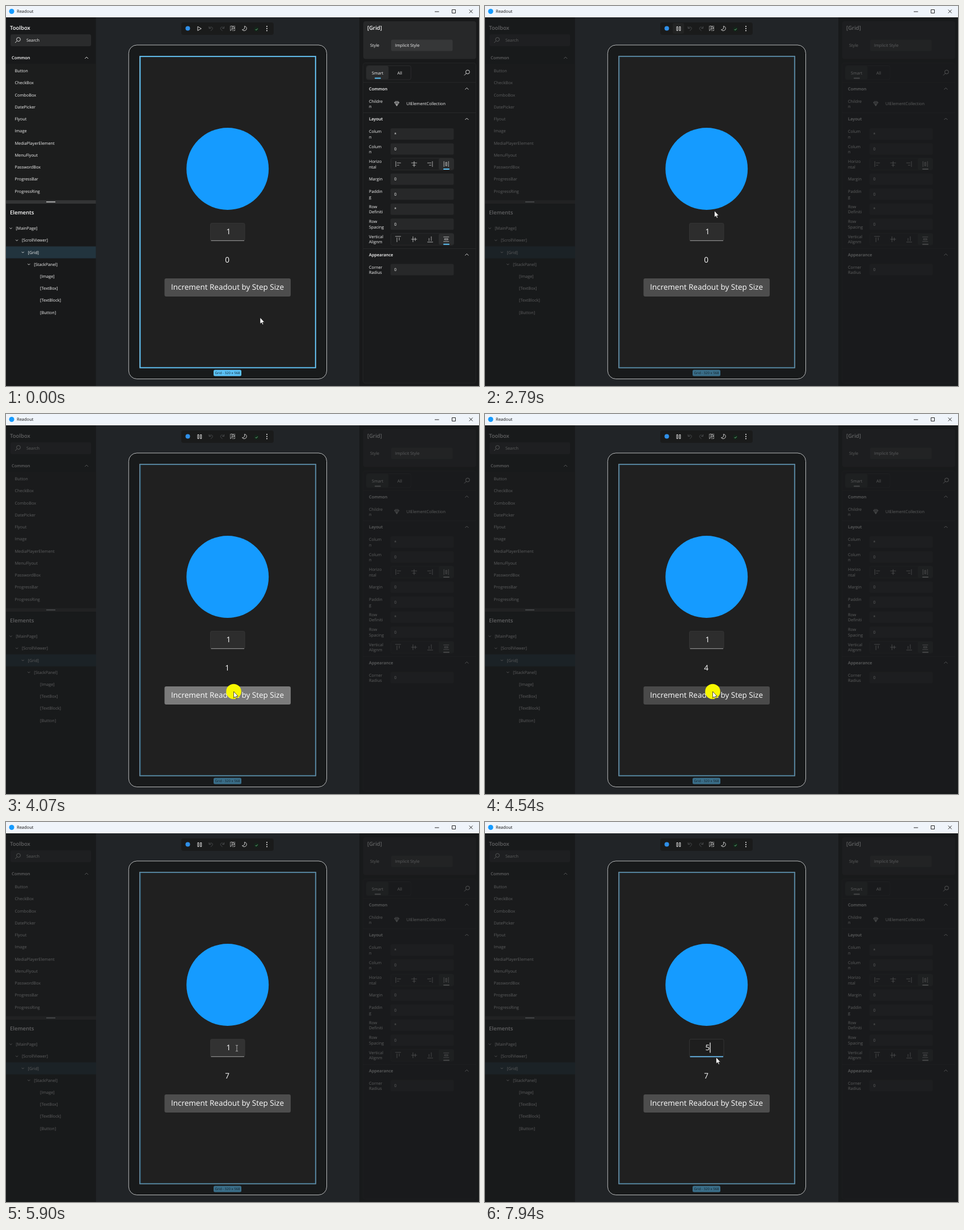
Recreate the animation shown at these times as an HTML page. Size 834 px wide and 671 px high, loop 8000 ms.

```html
<!DOCTYPE html>
<html lang="en">
<head>
<meta charset="utf-8">
<title>Readout</title>
<style>
html, body { margin: 0; width: 100%; height: 100%; overflow: hidden; background: #212427; }
svg { display: block; width: 834px; height: 671px; --accent: #5cc2f7; }
text { font: 7.3px "Open Sans", "Noto Sans", sans-serif; fill: #f4f4f4; text-rendering: geometricPrecision; white-space: pre; }
.b { font-weight: 600; font-size: 7.4px; fill: #fff; }
.h { font-weight: 600; font-size: 9.5px; fill: #fff; }
.app { font-size: 13.5px; fill: #fff; text-anchor: middle; }
.ico { fill: none; stroke: #e8e8e8; stroke-width: .9; }
.soft { fill: none; stroke: #d0d0d0; stroke-width: .8; }
.off { stroke: #4c4f51; }
.dark { stroke: #111; }
.accent { fill: var(--accent); }
</style>
</head>
<body>
<svg id="stage" viewBox="0 0 834 671">
  <rect width="834" height="671" fill="#212427"/>

  <!-- device -->
  <rect x="216.3" y="68.9" width="349.2" height="589.6" rx="14.5" fill="#181a1b" stroke="#b9bbbc"/>
  <rect x="235.5" y="88.5" width="311" height="550.5" fill="#202020" stroke="#777c80"/>
  <g id="frame">
    <rect x="236.5" y="89.2" width="309.2" height="549.4" fill="none" stroke="#5cc2f7" stroke-width="1.8"/>
    <rect x="366" y="642.5" width="49" height="11" rx="2.5" fill="#5cc2f7"/>
    <text x="390.5" y="650.3" style="font-size:6px;fill:#10202a;text-anchor:middle">Grid - 320 x 568</text>
  </g>
  <circle cx="390.7" cy="287.5" r="72.5" fill="#159bff"/>
  <rect id="box" y="383.5" height="31" rx="2.5"/>
  <path id="line"/>
  <text id="step" class="app" y="403.2"></text>
  <path id="caret" d="M397 389.5v18" stroke="#fff" stroke-width="1.2"/>
  <text id="count" class="app" x="390.2" y="453.2"></text>
  <rect id="button" x="279.5" y="481" width="222.5" height="32" rx="3"/>
  <text class="app" x="390.5" y="501.2">Increment Readout by Step Size</text>
  <rect id="hover" x="268.5" y="203.5" width="245" height="321" fill="none" stroke="#5cc2f7" stroke-opacity=".6"/>

  <!-- toolbar -->
  <rect x="309" y="29" width="163" height="22" rx="4" fill="#1a1b1b"/>
  <rect id="glow" x="331" y="30" width="20" height="19" rx="3" fill="#222323"/>
  <circle cx="320.5" cy="39.5" r="4" fill="#2f8fe8"/>
  <path id="play" class="ico" d="M338 36.3l6.3 3.6-6.3 3.6z"/>
  <path id="pause" class="ico" d="M338 36.5h2v7h-2zM342.7 36.5h2v7h-2z"/>
  <g class="ico off">
    <path id="undo" d="M358 36v3.5h3.5M358.3 39.2c2-3 6-2.6 6 .5 0 1.5-1.5 2.5-3.3 4"/>
    <use href="#undo" transform="matrix(-1 0 0 1 742.5 0)"/>
  </g>
  <g class="ico">
    <path d="M398 35.5H395.5V43.5M398 35.5h5.5v8H399" stroke-dasharray="1.4 1"/>
    <circle cx="400.3" cy="38.8" r="2"/><path d="M398.9 40.4l-3.2 3.4"/>
    <path d="M420.5 35.7c4 .2 5 5 2 7.2-2.5 1.5-5 .6-6-1.2 3.5 0 5-2.5 4-6z"/>
  </g>
  <rect x="437.5" y="37" width="8" height="8" rx="2" fill="#14241a"/>
  <path d="M439.8 41.2l1.4 1.4 2.5-2.8" fill="none" stroke="#6fd88c" stroke-width=".9"/>
  <g fill="#eee"><circle cx="460" cy="36" r="1"/><circle cx="460" cy="39.7" r="1"/><circle cx="460" cy="43.4" r="1"/></g>

  <g id="panels"></g>
  <g id="dim" fill="#191b1c"><rect y="20" width="158.5" height="651"/><rect x="623" y="20" width="211" height="651"/></g>

  <!-- title bar -->
  <rect width="834" height="20" fill="#eff4fa"/>
  <circle cx="10" cy="9.5" r="4.5" fill="#159bff"/>
  <text x="19" y="12.4" style="font-size:7.5px;fill:#111">Readout</text>
  <path class="ico dark" d="M756 10h7.5M786.5 6.5h6v6h-6zM816.8 6.5l6 6M822.8 6.5l-6 6"/>

  <circle id="click" r="13.3" fill="#f8f800"/>
  <path id="arrow" d="M0 0V11.3L2.6 9 4.3 12.8 6 12 4.4 8.4H7.8z" fill="#fff" stroke="#111" stroke-width=".7"/>
  <path id="beam" d="M-2 -5.2h1.500l.5 .5 .5-.5H2M0 -5V5M-2 5.2h1.500l.5-.5 .5 .5H2" fill="none" stroke="#ccc" stroke-width=".8"/>
</svg>
<script>
const el = id => document.getElementById(id);
const rect = (x, y, w, h, fill, r = 0, more = '') =>
  `<rect x="${x}" y="${y}" width="${w}" height="${h}" rx="${r}" fill="${fill}" ${more}/>`;
const path = (d, cls = 'ico') => `<path class="${cls}" d="${d}"/>`;
// y is the middle of the capitals
const text = (s, x, y, cls = '') =>
  `<text x="${x}" y="${y + (cls === 'h' ? 3.4 : 2.6)}" class="${cls}">${s}</text>`;
const up = (x, y) => path(`M${x - 3} ${y + 1.5}l3 -3 3 3`);
const down = (x, y) => path(`M${x - 2} ${y - 1}l2 2 2 -2`);
const lens = (x, y) => `<circle class="ico" cx="${x + 1}" cy="${y - 1}" r="3.4"/>` + path(`M${x - 1.5} ${y + 1.5}l-3.5 3.5`);
const underline = (x, y) => `<rect class="accent" x="${x}" y="${y}" width="11" height="2" rx="1"/>`;

function leftPanel() {
  const tools = ['Button', 'CheckBox', 'ComboBox', 'DatePicker', 'Flyout', 'Image',
    'MediaPlayerElement', 'MenuFlyout', 'PasswordBox', 'ProgressBar', 'ProgressRing'];
  const tree = ['MainPage', 'ScrollViewer', 'Grid', 'StackPanel', 'Image', 'TextBox', 'TextBlock', 'Button'];
  let s = rect(0, 20, 158.5, 651, '#18191a') + rect(0, 102, 158.5, 241, '#1c1d1d') +
    text('Toolbox', 7, 39, 'h') + rect(8, 50, 142, 21, '#2a2b2c', 3) + lens(21, 60) +
    text('Search', 36, 60) + text('Common', 10, 91.5, 'b') + up(142, 91.5);
  tools.forEach((name, i) => s += text(name, 15.5, 114.5 + i * 21.25));
  s += rect(0, 343, 158.5, 6, '#333435') + rect(71, 345.3, 16, 1.3, '#ddd') +
    text('Elements', 7, 364.5, 'h') + rect(0, 424.5, 158.5, 21, '#22343e');
  tree.forEach((name, i) => {
    const y = 392.5 + i * 21.22, depth = Math.min(i, 4);
    if (i < 4) s += down(8.5 + i * 10.6, y);
    s += text(`[${name}]`, 17.2 + depth * 10.7, y);
  });
  return s;
}

function segments(y, draw) {
  let s = rect(678.5, y - 10.5, 111, 21, '#1d1e1f', 3, 'stroke="#292a2b"') + rect(763, y - 10, 26.5, 20, '#2b2c2d', 3);
  for (let i = 0; i < 4; i++) s += path(draw(i, 691.3 + i * 28.3, y), 'soft');
  return s + underline(771, y + 8);
}
const horizontal = (i, x, y) => [
  `M${x - 4} ${y - 5}v10M${x - 2} ${y - 2}h7M${x - 2} ${y + 2}h4`,
  `M${x} ${y - 5}v10M${x - 5} ${y - 2}h10M${x - 3} ${y + 2}h6`,
  `M${x + 4} ${y - 5}v10M${x - 5} ${y - 2}h7M${x - 2} ${y + 2}h4`,
  `M${x - 4} ${y - 5}v10M${x + 4} ${y - 5}v10M${x - 1} ${y - 3}h2v6h-2z`][i];
const vertical = (i, x, y) => [
  `M${x - 5} ${y - 5}h10M${x - 2} ${y - 3}v8M${x + 2} ${y - 3}v5`,
  `M${x - 5} ${y}h10M${x - 2} ${y - 5}v10M${x + 2} ${y - 3}v6`,
  `M${x - 5} ${y + 5}h10M${x - 2} ${y - 2}v5M${x + 2} ${y - 5}v8`,
  `M${x - 5} ${y - 4}h10M${x - 5} ${y + 4}h10M${x - 3} ${y - 1}h6v2h-6z`][i];

function rightPanel() {
  const rows = [['Colum', 'n', '*'], ['Colum', 'n', '0'], ['Horizo', 'ntal', horizontal], ['Margin', '', '0'],
    ['Paddin', 'g', '0'], ['Row', 'Definiti', '*'], ['Row', 'Spacing', '0'], ['Vertical', 'Alignm', vertical]];
  const label = (a, b, y) => b ? text(a, 640, y - 4.5) + text(b, 640, y + 5) : text(a, 640, y);
  const field = (v, y) => rect(678, y - 10, 111.5, 20, '#272829', 2.5) + text(v, 684.5, y);
  const rule = y => rect(630, y, 199, 1, '#272829');
  const head = (name, y) => text(name, 640, y, 'b') + up(812.5, y);

  let s = rect(623, 20, 211, 651, '#18191a') + rect(630, 27, 199, 66.5, '#272829', 4) +
    text('[Grid]', 637, 39, 'h') + text('Style', 642, 69.5) +
    rect(679, 59.5, 108.5, 20, '#363738', 2.5) + text('Implicit Style', 686, 69) +
    rect(629.5, 100.5, 199, 565.5, '#1a1b1c', 4, 'stroke="#232425"') +
    rect(635.5, 105.5, 78.5, 24.5, '#1a1b1c', 3, 'stroke="#2a2b2c"') + rect(636, 106, 38.5, 23.5, '#2b2c2d', 3) +
    text('Smart', 645, 118) + text('All', 690, 118) + underline(650, 126.5) + lens(813, 117.5) +
    rule(134.5) + head('Common', 146) + label('Childre', 'n', 172.5) +
    path('M685 170.500l1.500-2h5l1.500 2-4 6zM685 170.500h8M687.500 170.500l1.500 5 1.500-5', 'soft') +
    text('UIElementCollection', 706, 172.5) +
    rule(188) + head('Layout', 199.5);
  rows.forEach(([a, b, v], i) => {
    const y = 226 + i * 26.55;
    s += label(a, b, y) + (v.call ? segments(y, v) : field(v, y));
  });
  return s + rule(428) + head('Appearance', 439) + label('Corner', 'Radius', 465.5) + field('0', 465.5);
}
el('panels').innerHTML = leftPanel() + rightPanel();

// time, x, y, easing power into this point (negative eases out)
const route = [[0, 448, 550, 1], [720, 448, 550, 1], [1460, 337, 65, -1.8], [1530, 336.5, 56, 1], [1740, 338, 36.5, -2],
  [2380, 338, 36.5, 1], [2790, 404.5, 361, 1.3], [2850, 405, 404, 1], [3260, 401.5, 490, -2], [5380, 401.5, 490, 1],
  [5880, 407, 399.5, -1.6], [6290, 407, 399.5, 1], [6300, 406.5, 399.5, 1],
  [7580, 406.5, 399.5, 1], [7940, 407.5, 415.5, -1.5], [8000, 407.5, 415.5, 1]];
// press, button release, circle gone
const clicks = [[3730, 3790, 3850], [4070, 4130, 4190], [4260, 4320, 4380], [4450, 4520, 4590],
  [4650, 4710, 4770], [4810, 4870, 4930], [4990, 5050, 5230]];
const otherClicks = [[2050, 2230], [6550, 6710]];

function pointer(t) {
  const i = Math.max(1, route.findIndex(p => p[0] > t));
  const [t0, x0, y0] = route[i - 1], [t1, x1, y1, p] = route[i];
  const k = (t - t0) / (t1 - t0);
  const e = p > 0 ? k ** p : 1 - (1 - k) ** -p;
  return [x0 + (x1 - x0) * e, y0 + (y1 - y0) * e];
}
const show = (id, on) => el(id).setAttribute('visibility', on ? 'visible' : 'hidden');
const set = (id, attrs) => { for (const k in attrs) el(id).setAttribute(k, attrs[k]); };

function render(t) {
  const [x, y] = pointer(t);
  const place = { transform: `translate(${x} ${y})` };
  const overBox = t > 5380 && y < 414;
  const empty = t >= 7020 && t < 7580, focused = t >= 7020;
  ['arrow', 'beam', 'click'].forEach(id => set(id, place));
  show('arrow', !overBox);
  show('beam', overBox && !empty);
  show('click', clicks.some(c => t >= c[0] && t < c[2]) || otherClicks.some(c => t >= c[0] && t < c[1]));
  show('hover', t > 720 && t < 1530 && y > 203 && y < 525);

  const playing = t >= 2110;
  show('play', !playing);
  show('pause', playing);
  show('glow', playing && t < 2850);
  el('stage').style.setProperty('--accent', playing ? '#a8a8a8' : '#5cc2f7');
  const fade = Math.min(1, Math.max(0, (t - 2110) / 330));
  set('dim', { opacity: .69 * fade });
  set('frame', { opacity: 1 - .5 * fade });

  const lit = clicks.some((c, i) => i < 6 && t >= c[0] && t < c[1]);
  const overButton = playing && y > 481 && y < 513;
  set('button', { fill: lit ? '#7b7b7b' : overButton ? '#4a4a4a' : '#4d4d4d' });
  el('count').textContent = clicks.filter(c => t >= c[1]).length;

  const left = empty ? 354.5 : 360.5, right = empty ? 426.5 : 421;
  set('box', { x: left, width: right - left, fill: focused ? '#1e1e1e' : overBox ? '#323232' : '#2d2d2d', stroke: focused ? '#333' : '#343434' });
  set('line', { d: `M${left + 1} 414.3H${right - 1}`, stroke: focused ? '#6cc0f5' : '#a0a0a0', 'stroke-width': focused ? 1.8 : 1 });
  set('step', { x: empty ? 390.5 : 392.4, style: empty ? 'fill:#a0a0a0' : '' });
  el('step').textContent = empty ? 'Step Size' : focused ? '5' : '1';
  show('caret', focused && !empty);
}

const start = performance.now();
function tick() {
  render((performance.now() - start) % 8000);
  requestAnimationFrame(tick);
}
tick();
</script>
</body>
</html>
```
